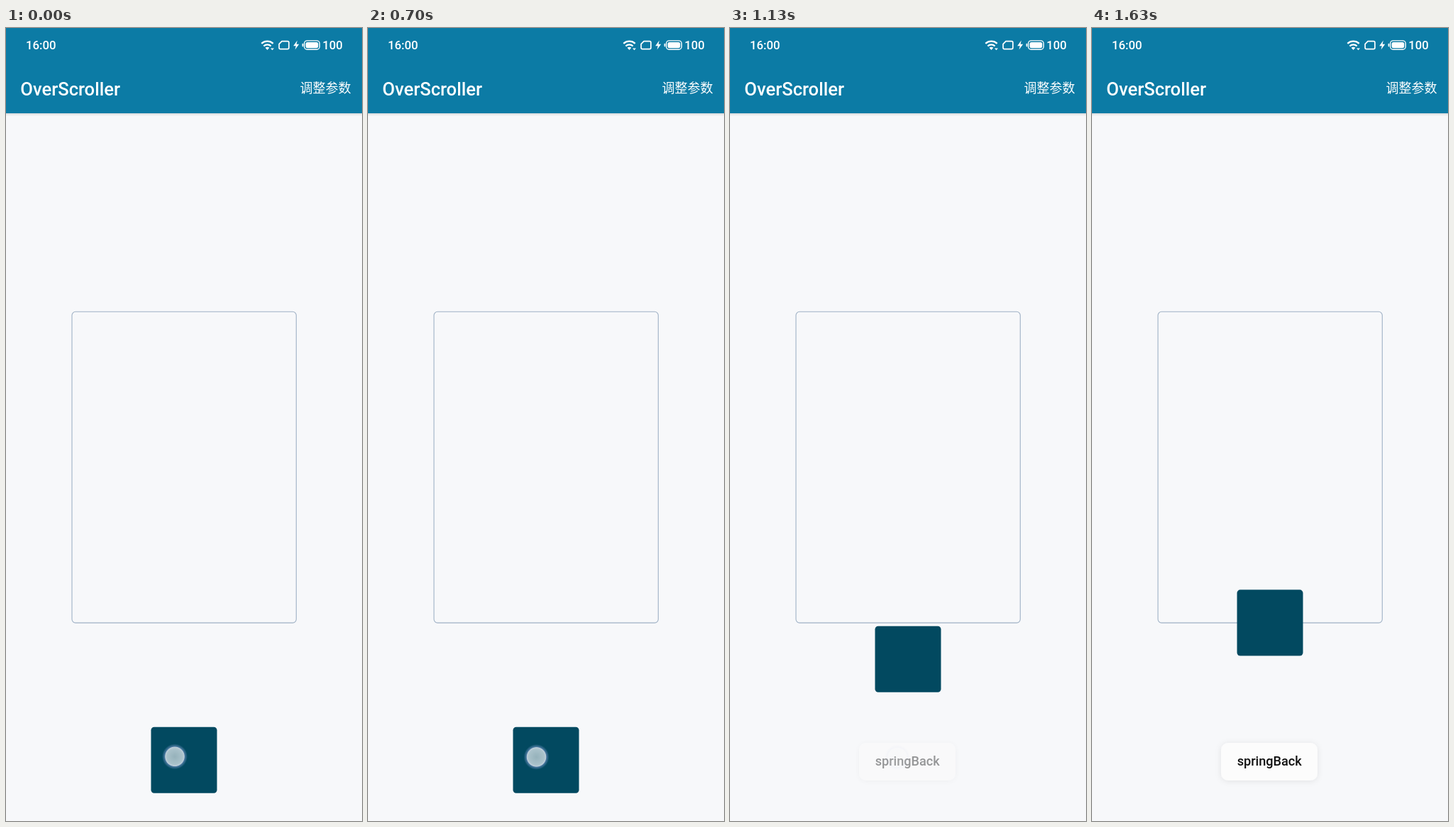
Animation of 502 by 1116 pixels, one loop 1660 ms. Source, as an HTML page:

```html
<!DOCTYPE html>
<html lang="zh">
<head>
<meta charset="utf-8">
<title>OverScroller</title>
<style>
  html, body { margin: 0; width: 100%; height: 100%; overflow: hidden; background: #f7f8fa; }
  svg { display: block; width: 502px; height: 1116px; }
  text { font-family: Roboto, "Noto Sans CJK SC", "Noto Sans CJK", sans-serif; font-weight: 500; }
  .cjk { font-family: "Noto Sans CJK SC", "Noto Sans CJK", sans-serif; font-weight: 400; }
</style>
</head>
<body>
<svg viewBox="0 0 502 1116" xmlns="http://www.w3.org/2000/svg">
  <defs>
    <radialGradient id="glow">
      <stop offset="0" stop-color="#e2e8ea" stop-opacity=".66"/>
      <stop offset=".6" stop-color="#eaf0f3" stop-opacity=".72"/>
      <stop offset=".74" stop-color="#eceff8" stop-opacity=".8"/>
      <stop offset=".79" stop-color="#8fa6dc" stop-opacity=".5"/>
      <stop offset="1" stop-color="#8fa6dc" stop-opacity="0"/>
    </radialGradient>
    <linearGradient id="edge" x2="0" y2="1">
      <stop offset="0" stop-color="#000" stop-opacity=".12"/>
      <stop offset="1" stop-color="#000" stop-opacity="0"/>
    </linearGradient>
    <filter id="soft" x="-20%" y="-40%" width="140%" height="180%">
      <feDropShadow dx="0" dy="1" stdDeviation="4" flood-color="#000" flood-opacity=".09"/>
    </filter>
  </defs>

  <rect width="502" height="1116" fill="#f7f8fa"/>
  <rect y="120" width="502" height="4" fill="url(#edge)"/>
  <rect width="502" height="120" fill="#0c7ba5"/>

  <g fill="#fff">
    <text x="28" y="30" font-size="16.8">16:00</text>
    <text x="446.3" y="30" font-size="16.6">100</text>
    <text x="20.3" y="94.5" font-size="25.6">OverScroller</text>
    <text class="cjk" x="414.5" y="91.3" font-size="18">调整参数</text>

    <g fill="none" stroke="#fff" stroke-width="2.3">
      <path d="M360.3 21.8A12.2 12.2 0 0 1 376.7 21.8"/>
      <path d="M363.4 25.5A7.4 7.4 0 0 1 373.6 25.5"/>
      <path d="M389 18.6H397Q398.9 18.6 398.9 20.5V27.7Q398.9 29.6 397 29.6H387Q385.1 29.6 385.1 27.7V22.6Z" stroke-width="1.7" stroke-linejoin="round"/>
      <rect x="420.6" y="17.9" width="21.6" height="12.4" rx="4" stroke-width="1.4"/>
    </g>
    <path d="M365.6 27.8Q368.5 25.6 371.4 27.8L368.5 31Z"/>
    <path d="M373 28.4H378L375.5 31.3Z"/>
    <path d="M410.8 17.6L405.2 25.2H408.8L407.6 30.6L413.2 22.8H409.6Z"/>
    <rect x="422.6" y="19.9" width="17.6" height="8.4" rx="2.4"/>
    <rect x="417.6" y="21.8" width="1.7" height="4.6" rx=".8"/>
  </g>

  <rect x="93" y="399.3" width="316.3" height="437.8" rx="5" fill="none" stroke="#9fb1c5" stroke-width="1.1"/>
  <rect id="box" x="204.5" width="93" height="93" rx="4.5" fill="#024960"/>

  <g id="toast">
    <rect x="182" y="1006" width="136" height="53" rx="10" fill="#fcfcfc" filter="url(#soft)"/>
    <text x="250.2" y="1038.3" font-size="18.1" text-anchor="middle" fill="#111">springBack</text>
  </g>
  <circle id="touch" r="18" fill="url(#glow)"/>
</svg>
<script>
  const LOOP = 1660, STEP = 100 / 3;
  const START_Y = 983.7, REST_Y = 790.5;
  const [box, toast, touch] = ["box", "toast", "touch"].map(id => document.getElementById(id));

  // Linear interpolation through [time, value] points
  function track(points, t) {
    if (t <= points[0][0]) return points[0][1];
    for (let i = 1; i < points.length; i++) {
      const [t0, a] = points[i - 1], [t1, b] = points[i];
      if (t <= t1) return a + (b - a) * (t - t0) / (t1 - t0);
    }
    return points[points.length - 1][1];
  }

  // Viscous-fluid easing: short quadratic start, exponential settle
  function viscous(x) {
    return x < 1 ? x - 1 + Math.exp(-x) : 1 - (1 - Math.exp(-1)) * Math.exp(1 - x);
  }

  const springPhase = [[945, 0], [1033, .873], [1133, 1.865], [1333, 4.31], [1633, 8]];
  const toastAlpha = [[1000, 0], [1033, .07], [1133, .42], [1333, .9], [1480, 1]];
  const touchAlpha = [[950, 1], [1033, .55], [1133, .1], [1167, 0]];
  const touchX = [[430, 238], [700, 237.5], [967, 236]];
  const touchY = [[430, 1025.3], [700, 1025.9], [967, 1026.4]];

  function draw(t) {
    box.setAttribute("y", START_Y + (REST_Y - START_Y) * viscous(track(springPhase, t)));
    toast.setAttribute("opacity", track(toastAlpha, t));
    touch.setAttribute("opacity", track(touchAlpha, t));
    touch.setAttribute("cx", track(touchX, t));
    touch.setAttribute("cy", track(touchY, t));
  }

  function snap(ms) {
    const t = Math.floor(ms % LOOP / 10) * 10;
    return Math.floor((t + 5) / STEP) * STEP;
  }

  const begin = performance.now();
  function tick() {
    draw(snap(performance.now() - begin));
    requestAnimationFrame(tick);
  }
  tick();
</script>
</body>
</html>
```
